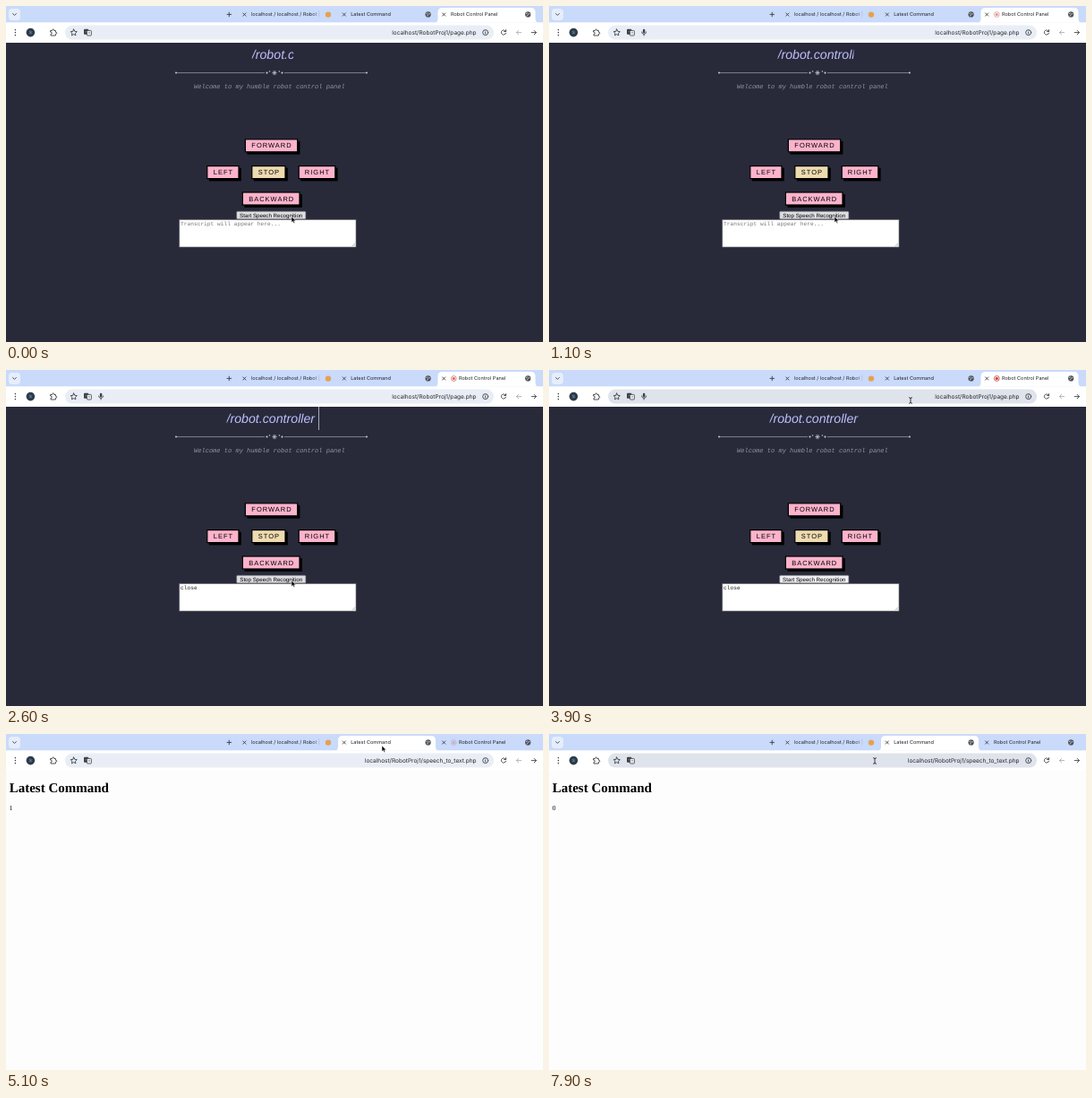
Write an HTML page that moves like this. It is 600 px wide and 375 px high and loops after 8000 ms.

```html
<!DOCTYPE html>
<html lang="en">
<head>
<meta charset="utf-8">
<title>Robot Control Panel</title>
<style>
  html, body { margin: 0; width: 100%; height: 100%; overflow: hidden; background: #fdfdfd; }
  svg { display: block; width: 100vw; height: 100vh; }
  text { text-rendering: geometricPrecision; white-space: pre; }
  .ui { font-family: Inter, Roboto, sans-serif; fill: #24262b; }
  .tab { font-size: 5.6px; }
  .url { font-size: 6.5px; text-anchor: end; }
  .sans { font-family: "Liberation Sans", Arial, sans-serif; }
  .mono { font-family: "Liberation Mono", "Courier New", monospace; }
  .serif { font-family: "Liberation Serif", Times, serif; }
  .line { fill: none; stroke: #3c4043; stroke-width: .9; stroke-linecap: round; stroke-linejoin: round; }
</style>
</head>
<body>
<svg viewBox="0 0 600 375" preserveAspectRatio="none">
  <defs>
    <linearGradient id="fade"><stop offset=".6" stop-color="#c9dafb" stop-opacity="0"/><stop offset="1" stop-color="#c9dafb"/></linearGradient>
    <clipPath id="typed"><rect id="typedBox" y="41" height="27"/></clipPath>
    <path id="close" class="line" d="M-1.6-1.6 1.6 1.6M1.6-1.6-1.6 1.6"/>
    <g id="globe">
      <circle r="3.1" fill="#4a4d52"/>
      <path d="M-2.2-1.2Q-.8-.2-.4-2M-1.6 1.8Q0 1.4 .2 0T2.3-.5" fill="none" stroke="#dfe6f4" stroke-width=".8"/>
    </g>
    <path id="activeTab" fill="#fff" d="M-4 18.5Q0 18.5 0 14V7Q0 2 5 2H104Q109 2 109 7V14Q109 18.5 113 18.5Z"/>
  </defs>

  <g id="panel">
    <rect y="40" width="600" height="335" fill="#282a3a"/>
    <g clip-path="url(#typed)">
      <text id="title" class="sans" y="58.6" font-size="14.2" font-style="italic" fill="#bfbffc">/robot.controller</text>
    </g>
    <rect id="caret" y="41" width="1" height="26" fill="#a9abc0"/>
    <g fill="#c3c4dd">
      <path d="M190 74.6H289M311 74.6H403" stroke="#a3a5bf" stroke-width=".7"/>
      <circle cx="190" cy="74.6" r="1"/><circle cx="403" cy="74.6" r="1"/>
      <circle cx="291.5" cy="74.6" r="1.1"/><circle cx="308.5" cy="74.6" r="1.1"/>
      <circle cx="294.6" cy="73" r=".8"/><circle cx="305.4" cy="73" r=".8"/>
      <path d="M297.4 74.6H302.6M300 72V77.2M298.2 72.8 301.8 76.4M301.8 72.8 298.2 76.4" stroke="#c3c4dd" stroke-width=".8"/>
    </g>
    <text class="mono" x="210" y="92" font-size="7.04" font-style="italic" fill="#9194a6">Welcome to my humble robot control panel</text>
    <g id="buttons"></g>
    <rect id="speechBox" x="257.7" y="229.2" width="77.2" height="8.5" rx="1" stroke="#6d6d73" stroke-width=".6"/>
    <text id="speech" class="sans" x="296.2" y="235.5" font-size="6.2" text-anchor="middle"></text>
    <rect x="193.8" y="238.6" width="197.2" height="30.4" fill="#fff" stroke="#76767c" stroke-width=".6"/>
    <path d="M387 268 390 265M389 268 390 267" stroke="#777" stroke-width=".5"/>
    <text id="transcript" class="mono" x="195" y="245.3" font-size="6.23"></text>
  </g>

  <g id="command" class="serif">
    <rect y="40" width="600" height="335" fill="#fdfdfd"/>
    <text x="3.7" y="65" font-size="15" font-weight="bold">Latest Command</text>
    <text id="value" x="3.7" y="85.2" font-size="7.5"></text>
  </g>

  <rect width="600" height="19" fill="#c9dafb"/>
  <rect y="18.3" width="600" height="22.7" fill="#fff"/>
  <use id="active" href="#activeTab"/>
  <rect id="tabHover" x="371" y="2.8" width="108" height="13.4" rx="4.5" fill="#9dbcf6"/>
  <rect x="3" y="3" width="13" height="13" rx="4" fill="#e6eefc"/>
  <path class="line" d="M7.6 8.5 9.5 10.4 11.4 8.5"/>
  <path class="line" d="M247 9.4H251.6M249.3 7.1V11.7"/>
  <use href="#close" x="266.4" y="9.5"/><use href="#close" x="377.8" y="9.5"/><use href="#close" x="489.2" y="9.5"/>
  <g class="ui tab">
    <text x="273.8" y="11.4">localhost / localhost / Robot |</text>
    <rect x="325" y="4" width="28" height="11" fill="url(#fade)"/>
    <text x="385.2" y="11.4">Latest Command</text>
    <text id="panelTab" y="11.4">Robot Control Panel</text>
  </g>
  <circle cx="360" cy="9.6" r="3.2" fill="#e5a252"/>
  <use href="#globe" x="471.6" y="9.4"/><use href="#globe" x="583.2" y="9.4"/>
  <g id="record">
    <circle cx="500.3" cy="9.5" r="2.9" fill="none" stroke="#c5392f" stroke-width=".8"/>
    <circle cx="500.3" cy="9.5" r="1.6" fill="#c5392f"/>
  </g>

  <rect id="omnibox" x="66" y="21.6" width="479" height="16" rx="8"/>
  <g fill="#3c4043"><circle cx="10.4" cy="26.6" r=".8"/><circle cx="10.4" cy="29.6" r=".8"/><circle cx="10.4" cy="32.6" r=".8"/></g>
  <circle cx="27.4" cy="29.6" r="4.8" fill="#2b3c4b"/>
  <text class="ui" x="27.4" y="31.2" font-size="4.4" text-anchor="middle" style="fill:#c3ced6">S</text>
  <path class="line" d="M50 27.5H51.6Q51.6 25.9 52.7 25.9T53.8 27.5H55.4V29.2Q56.8 29.2 56.8 30.2T55.4 31.2V33H50V31.4Q51.4 31.4 51.4 30.2T50 29Z"/>
  <path class="line" d="M75.7 26 76.8 28.3 79.3 28.6 77.5 30.3 77.9 32.8 75.7 31.6 73.5 32.8 73.9 30.3 72.1 28.6 74.6 28.3Z"/>
  <rect x="87" y="25.8" width="5.2" height="6" rx=".8" fill="#3c4043"/>
  <rect x="90.4" y="27.4" width="5" height="5.6" rx=".8" fill="#eef1f7" stroke="#3c4043" stroke-width=".8"/>
  <path d="M88.4 28.8H90.6M91.8 29.6H94M92.9 29V31.4" stroke="#8d9196" stroke-width=".6"/>
  <g id="mic"><rect x="104.9" y="25.8" width="2.4" height="4.4" rx="1.2" fill="#3c4043"/><path class="line" d="M103.6 29Q103.6 31.3 106.1 31.3T108.6 29M106.1 31.4V33"/></g>
  <text id="url" class="ui url" x="525.5" y="31.8"></text>
  <circle class="line" cx="535.7" cy="29.6" r="3"/>
  <path class="line" d="M535.7 29.4V31M535.7 28V28.1"/>
  <circle id="reloadHover" cx="556" cy="29.6" r="8" fill="#e9ebef"/>
  <path class="line" d="M558.3 28.3A2.6 2.6 0 1 0 558.5 30.2M558.6 26.6V28.5H556.7"/>
  <path class="line" style="stroke:#a9acb1" d="M575.6 29.6H570.4M572.6 27.4 570.4 29.6 572.6 31.8"/>
  <path class="line" d="M587.2 29.6H592.4M590.2 27.4 592.4 29.6 590.2 31.8"/>

  <path id="arrow" d="M0 0V6.6L1.6 5.2 2.6 7.5 3.7 7 2.7 4.8H4.8Z" fill="#000" stroke="#fff" stroke-width=".5"/>
  <path id="beam" class="line" style="stroke:#111;stroke-width:.8" d="M-1.5-3.3Q0-3.3 0-2.2Q0-3.3 1.5-3.3M0-2.2V2.2M-1.5 3.3Q0 3.3 0 2.2Q0 3.3 1.5 3.3"/>
</svg>
<script>
const $ = id => document.getElementById(id);
const set = (id, attrs) => { for (const k in attrs) $(id).setAttribute(k, attrs[k]); };
const show = (id, on) => set(id, { visibility: on ? "visible" : "hidden" });
const label = (id, s) => { if ($(id).textContent !== s) $(id).textContent = s; };
const clamp = x => Math.max(0, Math.min(1, x));
const smooth = x => x * x * (3 - 2 * x);

// Value of a track of [time, ...numbers] stops at time t
function track(stops, t, ease = x => x) {
  let i = 0;
  while (i < stops.length - 2 && t >= stops[i + 1][0]) i++;
  const [a, b] = [stops[i], stops[i + 1]];
  const k = ease(clamp((t - a[0]) / (b[0] - a[0])));
  return a.slice(1).map((v, j) => v + (b[j + 1] - v) * k);
}

const LOOP = 8;
const OPENED = 5.1;
const RECORDING = [[.1, 0], [.5, 1], [.7, 1], [1.5, .08], [3, 1], [4.5, 1], [5.1, .3], [6, 0]];
const MOUSE = [
  [3.2, 319, 235], [3.9, 404, 34], [4.2, 404, 33], [4.8, 420, 13], [5.4, 420, 13],
  [6.1, 556, 29], [6.4, 556, 30], [6.7, 556, 41], [7.6, 556, 41], [7.9, 364, 30]
];

// name, x, y, width, fill
const BUTTONS = [
  ["FORWARD", 268, 149.4, 57], ["LEFT", 225.4, 179.2, 34], ["STOP", 275.4, 179.2, 36, "#eedbb0"],
  ["RIGHT", 327.8, 179.2, 39.4], ["BACKWARD", 265, 208.6, 62.4]
];
$("buttons").innerHTML = BUTTONS.map(([name, x, y, w, fill = "#fcb3cb"]) => `
  <rect x="${x + 1.4}" y="${y + 1.4}" width="${w + 2}" height="14.8"/>
  <rect x="${x - .6}" y="${y - .6}" width="${w + 1.2}" height="14" fill="${fill}" stroke="#000" stroke-width="1.2"/>
  <text class="sans" x="${x + w / 2 + .5}" y="${y + 9}" font-size="7.5" letter-spacing="1" text-anchor="middle">${name}</text>`).join("");

function render(t) {
  const onPanel = t < OPENED;
  show("panel", onPanel);
  show("command", !onPanel);
  label("url", "localhost/RobotProj1/" + (onPanel ? "page.php" : "speech_to_text.php"));
  label("value", t < 6.5 ? "1" : "0");

  // Title typed in 40 steps over 3 s, already partly done
  const width = 103 * Math.min(40, Math.floor((t + 1.38) / .075)) / 40;
  const left = 298 - width / 2;
  set("typedBox", { x: left, width });
  set("title", { x: left });
  set("caret", { x: left + width - .5 });
  show("caret", onPanel && t % 1 >= .25 && t % 1 < .75);

  const [x, y] = track(MOUSE, t, smooth);
  const inBar = x > 66 && x < 545 && y > 21.6 && y < 37.6;
  set("arrow", { transform: `translate(${x} ${y})` });
  set("beam", { transform: `translate(${x} ${y})` });
  show("arrow", !inBar);
  show("beam", inBar);
  set("omnibox", { fill: inBar ? "#dfe3eb" : "#e9eef6" });
  show("reloadHover", Math.hypot(x - 556, y - 29.6) < 8);

  const listening = t >= .1 && t < 2.8;
  label("speech", (listening ? "Stop" : "Start") + " Speech Recognition");
  set("speechBox", { fill: y > 229 ? "#dedee2" : "#efeff1" });
  const heard = t >= 2.5;
  label("transcript", heard ? "close" : "Transcript will appear here...");
  set("transcript", { fill: heard ? "#222" : "#78787c" });

  set("active", { x: onPanel ? 482.5 : 371 });
  set("tabHover", { opacity: onPanel ? clamp((t - 4.55) / .2) : 0 });
  set("record", { opacity: track(RECORDING, t)[0] });
  set("panelTab", { x: t >= .1 && t < 6.2 ? 505.9 : 496.9 });
  show("mic", onPanel && t >= .1);
}

function tick() {
  render(performance.now() / 1000 % LOOP);
  requestAnimationFrame(tick);
}
tick();
</script>
</body>
</html>
```
